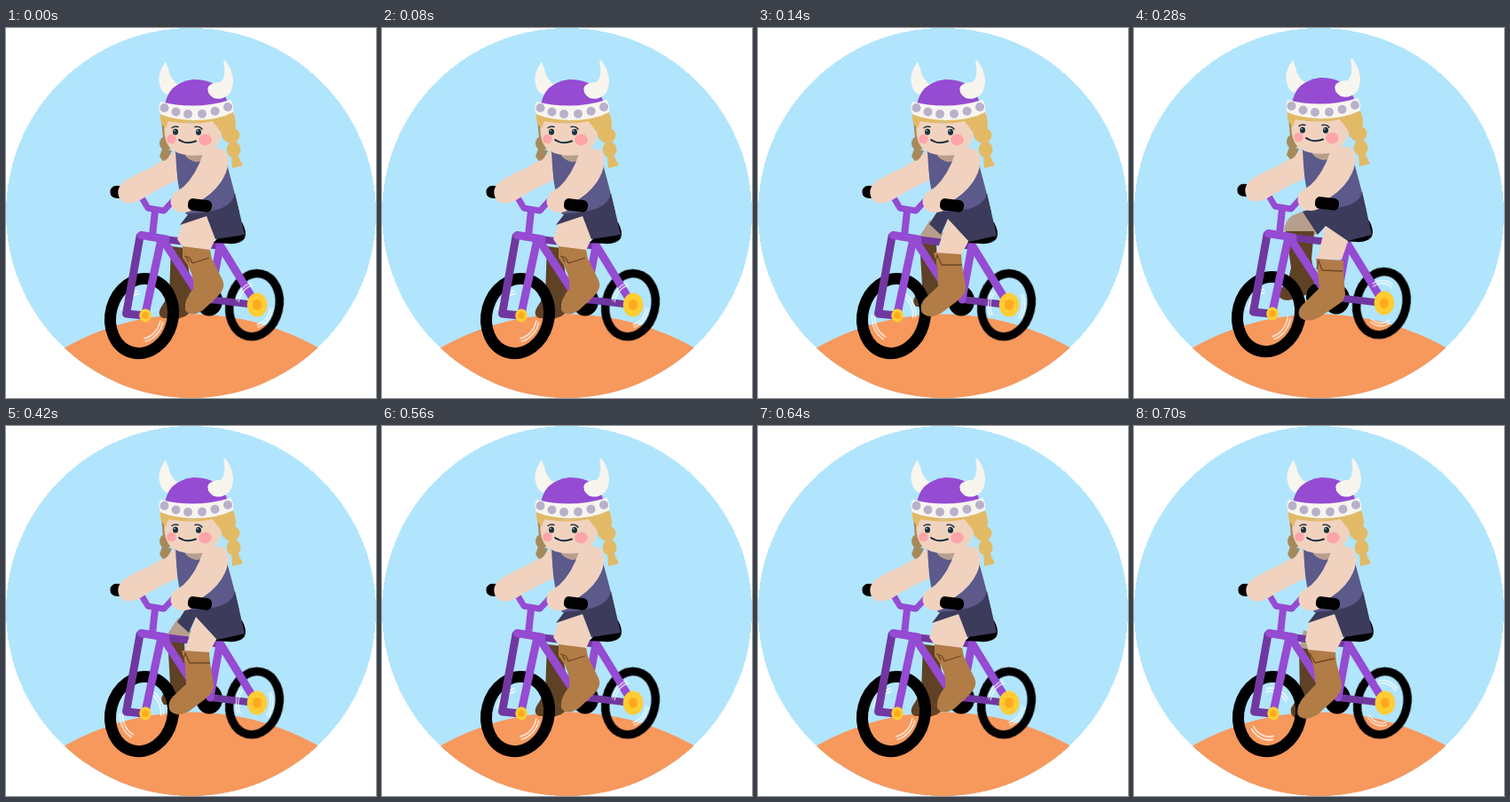
Animation, 417 px wide and 417 px high, one loop 0.84 s. Source, as an HTML page:

```html
<!DOCTYPE html>
<html lang="en">
<head>
<meta charset="utf-8">
<title>Viking cyclist</title>
<style>
html, body { margin: 0; width: 100%; height: 100%; overflow: hidden; background: #fff; }
svg { display: block; width: 100vw; height: 100vh; }
.bob, .pose, .spin { animation: .84s step-end infinite; }
.bob { animation-name: bob; }
.back { animation-name: back; }
.mid { animation-name: mid; }
.high { animation-name: high; }
.low { animation-name: low; }
.spin.front { animation-name: spin-front; }
.spin.rear { animation-name: spin-rear; }
@keyframes bob { 0%, 50%, 100% { transform: none; } 33.333% { transform: translate(-1px, -2px); } }
@keyframes back { 0%, 66.667%, 100% { opacity: 1; } 16.667%, 83.333% { opacity: 0; } }
@keyframes mid { 0%, 33.333%, 66.667%, 100% { opacity: 0; } 16.667%, 50% { opacity: 1; } }
@keyframes high { 0%, 50%, 100% { opacity: 0; } 33.333% { opacity: 1; } }
@keyframes low { 0%, 100% { opacity: 0; } 83.333% { opacity: 1; } }
@keyframes spin-front {
  0%, 66.667%, 100% { transform: rotate(42deg); }
  16.667%, 50% { transform: rotate(145deg); }
  33.333% { transform: rotate(38deg); }
  83.333% { transform: rotate(108deg); }
}
@keyframes spin-rear {
  0%, 66.667%, 100% { transform: rotate(40deg); }
  16.667%, 50% { transform: rotate(0deg); }
  33.333% { transform: rotate(88deg); }
  83.333% { transform: rotate(-76deg); }
}
.line { fill: none; stroke-linecap: round; stroke-linejoin: round; }
.skin { fill: #f1d2bf; }
.shade { fill: #b79f8d; }
.boot { fill: #b27c47; }
.far { fill: #5f4126; }
.shorts { fill: #3c3b5b; }
.seam { fill: none; stroke: #6d4824; stroke-width: 1.3; }
.bone { fill: #f8f5ef; }
.hair { fill: #e2ba66; }
.dark-hair { fill: #a78a5a; }
.purple { stroke: #954bd2; }
.plum { stroke: #7137a1; }
.ink { fill: #14303e; }
</style>
</head>
<body>
<svg viewBox="0 0 417 417">
<defs>
  <clipPath id="disc"><circle cx="208.5" cy="208.5" r="208.5"/></clipPath>
  <g id="glints" fill="none" stroke="#fff" stroke-width="1.3" stroke-linecap="round">
    <g id="arcs">
      <path d="M20-14A24.4 24.4 0 0 1 20 14"/>
      <path d="M23.5-15A27.9 27.9 0 0 1 23.5 15"/>
    </g>
    <use href="#arcs" transform="scale(-1)"/>
  </g>
</defs>
<circle cx="208.5" cy="208.5" r="208.5" fill="#b1e5fd" shape-rendering="crispEdges"/>
<circle cx="209" cy="611" r="288.5" fill="#f7985d" clip-path="url(#disc)"/>

<g class="bob">
  <ellipse cx="280" cy="312.2" rx="27.8" ry="36" transform="rotate(13 280 312.2)" fill="none" stroke="#000" stroke-width="9.5"/>

  <!-- Far leg -->
  <g class="pose back">
    <path class="far" d="M186 246L202 248 207 278 211 312Q209 324 196 327L178 327Q170 325 174 316L184 300Z"/>
  </g>
  <g class="pose mid">
    <path class="shade" d="M194 216L209 231 203 243 180 238Z"/>
    <path class="far" d="M182 239L201 242 202 270 205 300Q203 312 192 314L178 314Q172 309 178 301L185 290Z"/>
  </g>
  <g class="pose high">
    <path class="shade" d="M193 208L209 233 203 236 170 231Q171 218 180 213Z"/>
    <path class="far" d="M172 231L204 231 201 262 205 284Q205 298 192 304L175 309Q164 309 164 301Q166 294 174 290L178 272Z"/>
    <ellipse cx="208" cy="305" rx="13" ry="15"/>
  </g>
  <g class="pose low">
    <path class="shade" d="M191 230L203 234 201 253 187 250Z"/>
    <path class="far" d="M186 250L202 252 206 290 204 318Q199 330 186 330Q175 328 177 318L187 302Z"/>
  </g>

  <!-- Bike -->
  <ellipse cx="229" cy="307.5" rx="15" ry="17"/>
  <g class="line" stroke-width="8">
    <path class="plum" d="M178 238L242 246M230 306L281 312"/>
    <path class="purple" stroke-width="9" d="M177 239L213 294M241 246L230 306M242 246L280 308"/>
  </g>
  <path d="M234 242Q242 234 248 221L266 219Q272 230 269 237Q264 244 251 243Z"/>
  <g transform="translate(280 312.2) rotate(5) scale(.74 .92)"><g class="spin rear"><use href="#glints"/></g></g>
  <ellipse cx="283" cy="312" rx="11.3" ry="13.5" fill="#ffcc32"/>
  <ellipse cx="283" cy="312" rx="5" ry="6" fill="#ffa91f"/>

  <ellipse cx="153" cy="324.6" rx="35" ry="42.5" transform="rotate(15 153 324.6)" fill="none" stroke="#000" stroke-width="13"/>
  <g transform="translate(153 324.6) rotate(5) scale(.88 1.05)"><g class="spin front"><use href="#glints"/></g></g>
  <g class="line" stroke-width="9">
    <path class="plum" d="M151 235L135.5 322 155 324"/>
    <path class="purple" d="M152.5 233.5L180 238M175 238L157 322"/>
    <path class="purple" stroke-width="8" d="M168 206L165 234"/>
    <path class="purple" stroke-width="7" d="M151 188L160 203 178 206 188 195"/>
  </g>
  <ellipse cx="157" cy="324" rx="6.8" ry="7.5" fill="#ffcc32"/>
  <circle cx="157" cy="324" r="3.7" fill="#ffa91f"/>

  <path d="M190 139Q207 134 230 137L247 147Q255 174 263 208Q237 214 203 210Q194 190 190 139Z" fill="#5b5a8a"/>

  <!-- Near leg and shorts -->
  <g class="pose back">
    <path class="skin" d="M226 211L236 237 229 253 200 248 193 238 200 218Z"/>
    <path class="boot" d="M199 246L230 250 232 260 244 284Q248 293 239 302L222 318Q208 327 202 318Q200 307 211 294Q213 285 206 269L199 259Z"/>
    <path class="seam" d="M201 257L207 259 210 265 229 259M203 257L206 264"/>
    <path class="shorts" d="M258 186Q255 208 206 209L196 222 226 212 236 238 269 233Z"/>
  </g>
  <g class="pose mid">
    <path class="skin" d="M214 215L238 239 228 257 201 254Z"/>
    <path class="boot" d="M198 253L229 255 230 267 234 291Q235 300 224 308L207 321Q193 329 185 321Q181 313 188 305L203 291 202 269Z"/>
    <path class="seam" d="M199 266L202 256 207 267 230 267"/>
    <path class="shorts" d="M258 186Q255 208 202 207L193 221 206 233 214 215 238 241 269 234Z"/>
  </g>
  <g class="pose high">
    <path class="skin" d="M217 225L243 240 235 263 207 262Z"/>
    <path class="boot" d="M206 262L237 264 237 277 239 302Q239 309 229 315L210 328Q196 335 188 328Q184 320 192 313L210 295 208 277Z"/>
    <path class="seam" d="M207 274L209 264 213 275 236 276"/>
    <path class="shorts" d="M258 186Q255 208 202 205L191 209 208 235 217 225 242 242 269 235Z"/>
  </g>
  <g class="pose low">
    <path class="skin" d="M226 211L236 237 226 257 197 255 193 241 198 219Z"/>
    <path class="boot" d="M196 252L227 255 228 266 234 290Q235 299 226 308L207 325Q193 334 185 326Q182 318 190 307L205 291 202 269Z"/>
    <path class="seam" d="M198 256L204 267 226 262"/>
    <path class="shorts" d="M258 186Q255 208 206 209L196 222 226 212 236 238 269 233Z"/>
  </g>

  <!-- Arms -->
  <path class="shade" d="M202 139L229 139Q228 150 214 151Q206 149 202 144Z"/>
  <rect x="117.5" y="178" width="24" height="14" rx="6.5" transform="rotate(3 129 185)"/>
  <path class="skin" d="M191 139L193 172Q171 181 151 194Q138 201 129 194Q122 182 133 173Q141 167 164 157Q176 150 191 139Z"/>
  <path class="skin" d="M222 142Q234 131 246 138Q254 148 247 165Q240 181 222 193Q213 207 201 208Q189 208 186 199Q184 190 191 185L200 179Q214 166 222 142Z"/>
  <rect x="205" y="193" width="27" height="13.5" rx="5.5" transform="rotate(7 218 200)"/>

  <!-- Head -->
  <g class="dark-hair">
    <path d="M175 103L186 105 185 127 177 124Z"/>
    <ellipse cx="180" cy="130" rx="7" ry="8"/>
    <path d="M176 136L187 138Q183 149 177 150L173 145Z"/>
  </g>
  <path class="hair" d="M174 94L254 91Q262 107 257 117L245 126 237 105 183 106 180 112Q172 108 174 94Z"/>
  <path class="skin" d="M179 104Q208 111 232 103L243 119Q239 138 222 143Q202 146 188 138Q176 129 179 104Z"/>
  <path class="hair" d="M177 99Q209 113 245 98L233 105Q210 110 183 105L180 113Q175 110 177 99Z"/>
  <g class="hair">
    <path d="M231 103L257 98Q260 112 251 119L243 118Z"/>
    <ellipse cx="254" cy="121" rx="9.5" ry="9"/>
    <ellipse cx="256.5" cy="137" rx="8" ry="9"/>
    <path d="M254 143L261 143 267 155 255 158Z"/>
  </g>
  <circle cx="186.5" cy="125" r="5.2" fill="#fda5aa"/>
  <ellipse cx="224.5" cy="126" rx="7.3" ry="6.5" fill="#fda5aa"/>
  <g class="ink">
    <ellipse cx="191" cy="117" rx="3" ry="3.5"/><ellipse cx="217" cy="117.3" rx="3" ry="3.5"/>
  </g>
  <g fill="#fff"><circle cx="190" cy="115.8" r=".7"/><circle cx="216" cy="116" r=".7"/></g>
  <g class="line" stroke="#14303e">
    <path stroke-width="1.4" d="M187 112.5Q190 110 194 111.5M213 111.5Q218 110 221 114"/>
    <path stroke-width="2" d="M195 126Q203 131.5 214 127.5"/>
  </g>

  <!-- Helmet -->
  <path class="bone" d="M180 38Q168 54 175 69Q179 77 190 76L197 65Q185 60 183 46Z"/>
  <path d="M179 88Q182 62 211 58Q241 57 250 84Q216 94 179 88Z" fill="#954bd2"/>
  <path class="bone" d="M247 36Q262 57 252 74Q244 82 234 79Q225 73 228 66Q232 61 242 61Q249 54 245 38Z"/>
  <path class="bone" d="M174 83Q214 93 253 81Q257 85 256 95Q239 104 211 104Q187 103 174 97Q171 90 174 83Z"/>
  <g fill="#b9b0ca">
    <circle cx="178.5" cy="90" r="5"/><circle cx="191.5" cy="94.5" r="5"/><circle cx="205" cy="97" r="5"/>
    <circle cx="221" cy="96.7" r="5"/><circle cx="235.5" cy="93.8" r="5"/><circle cx="250" cy="89" r="5"/>
  </g>
</g>
</svg>
</body>
</html>
```
